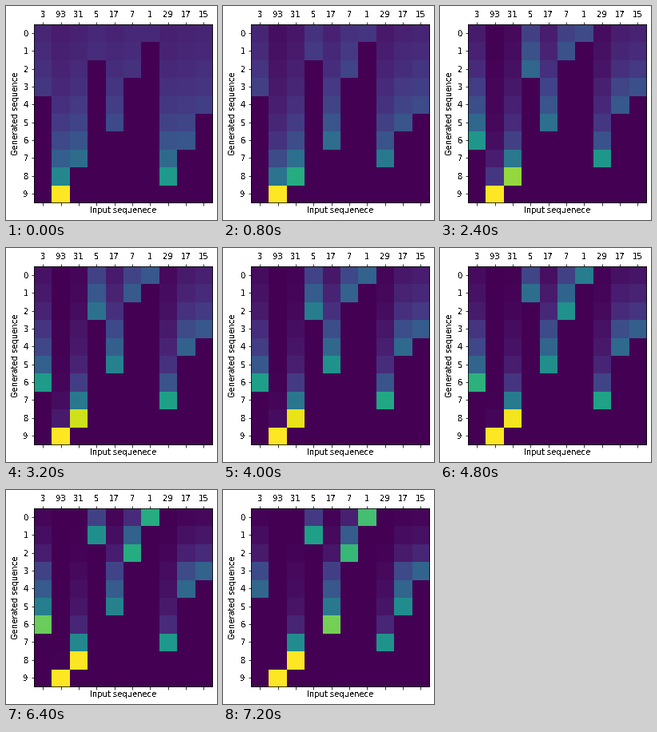
Write a matplotlib script that moves like this. It is 264 by 268 pixels and loops after 8 s.

```python
import numpy as np
import matplotlib.pyplot as plt
from matplotlib.animation import FuncAnimation
from matplotlib.transforms import Affine2D

W, H, DPI = 264, 268, 72
LEFT, TOP, SIDE = 35.2, 22.9, 223.2
STEPS = 10

# Each input with its attention logit, relative to 31, at the key steps.
KEY_STEPS = [0, 2, 5, 9]
CURVES = [
    (3, [0.17, 0.934, 1.2, 2.24]),
    (93, [-0.166, -0.79, -3.4, -6.2]),
    (31, [0, 0, 0, 0]),
    (5, [0.206, 1.54, 2.95, 5.1]),
    (17, [0.09, 0.76, 1.82, 2.05]),
    (7, [0.185, 1.51, 3.03, 4.44]),
    (1, [0.226, 1.61, 3.4, 6.52]),
    (29, [-0.017, 0.22, 0.42, 0.05]),
    (17, [0.033, 0.82, 1.83, 2.23]),
    (15, [0.12, 0.97, 2.02, 2.6]),
]
INPUTS = [value for value, _ in CURVES]


def attention(step):
    """Softmax over the inputs; the strongest is masked after each row."""
    left = np.exp([np.interp(step, KEY_STEPS, curve) for _, curve in CURVES])
    rows = []
    for _ in INPUTS:
        rows.append(left / left.sum())
        left[left.argmax()] = 0
    return np.array(rows)


plt.rcParams.update({
    "font.family": "DejaVu Sans",
    "font.size": 10,
    "text.antialiased": False,
})
fig = plt.figure(figsize=(W / DPI, H / DPI), dpi=DPI, facecolor="white")
ax = fig.add_axes([LEFT / W, 1 - (TOP + SIDE) / H, SIDE / W, SIDE / H])
image = ax.matshow(attention(0), cmap="viridis", vmin=0, vmax=1)
# The cells sit one pixel lower than the frame, so they fill it exactly.
image.set_transform(ax.transData + Affine2D().translate(0, -1))
image.set_clip_on(False)
ax.set_xticks(range(len(INPUTS)), INPUTS)
ax.set_yticks(range(len(INPUTS)))
ax.set_xlabel("Input sequenece", labelpad=1)
ax.set_ylabel("Generated sequence", labelpad=5)


def draw(step):
    image.set_data(attention(step))
    return [image]


anim = FuncAnimation(fig, draw, frames=STEPS, interval=800, repeat=True)
plt.show()
```
